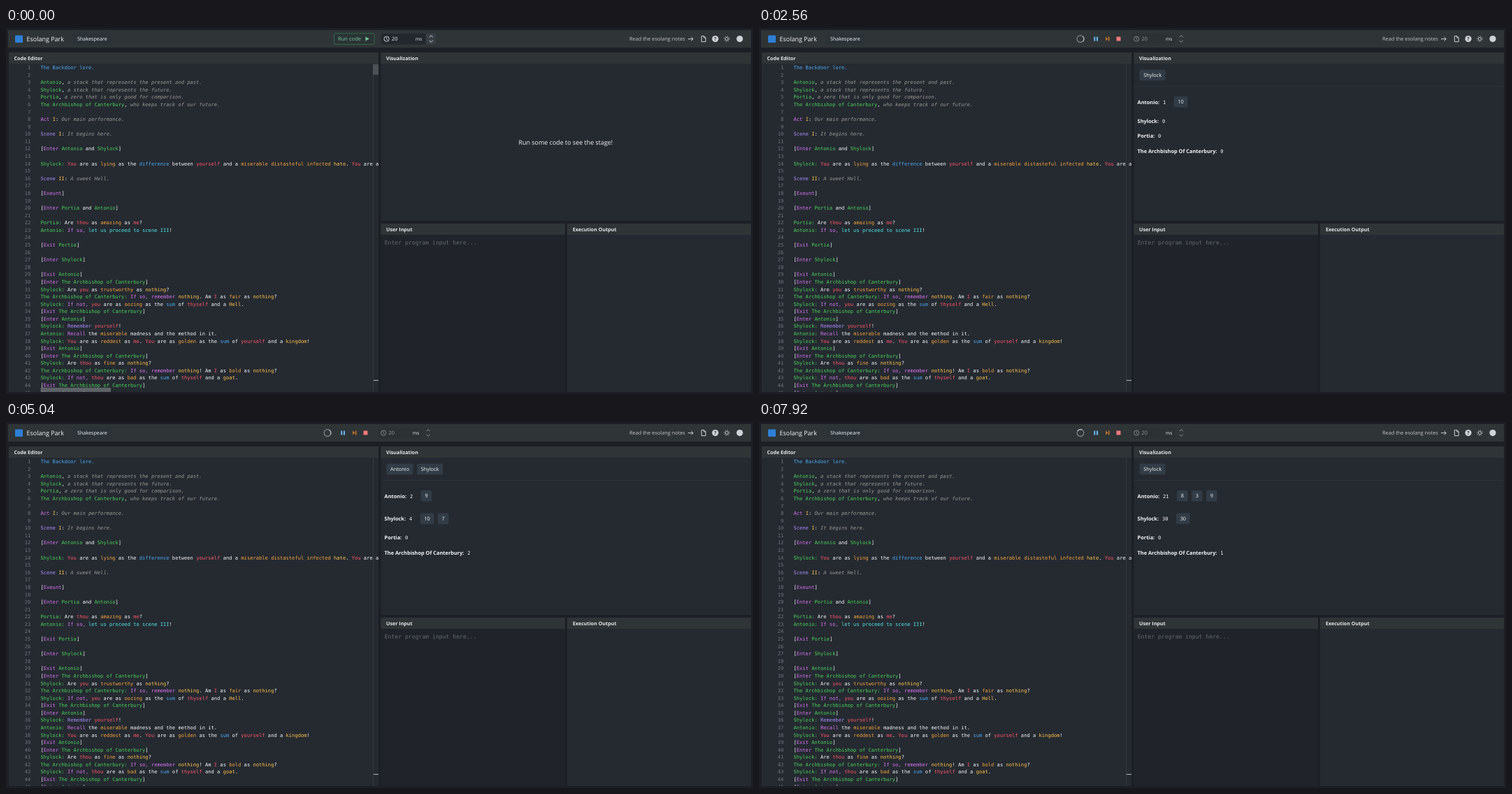
An HTML page that plays this animation: 1069x524 px, repeating every 8 s.

```html
<!DOCTYPE html>
<html lang="en">
<head>
<meta charset="utf-8">
<title>Esolang Park</title>
<style>
html, body { margin: 0; width: 100%; height: 100%; overflow: hidden; background: #1c2026; }
svg { display: block; width: 1069px; height: 524px; }
text { font: 7.35px "Open Sans", sans-serif; fill: #f3f5f7; white-space: pre; text-rendering: geometricPrecision; }
.h { font-size: 7.15px; font-weight: 700; fill: #e6e9ec; }
.lab { font-size: 7.4px; font-weight: 700; }
.m { font: 7.114px "DejaVu Sans Mono", monospace; }
.num { fill: #70767e; text-anchor: end; }
.g { fill: #49d159; } .r { fill: #ff5566; } .o { fill: #f5a33c; } .y { fill: #ffc24a; }
.b { fill: #4aa8f0; } .p { fill: #d873f2; } .v { fill: #a98bfa; } .c { fill: #52e6e6; }
.i { fill: #9a9890; font-style: italic; }
.ic { fill: none; stroke: #cfd3d8; stroke-width: 1; }
</style>
</head>
<body>
<svg id="stage" viewBox="0 0 1069 524"></svg>
<script>
const code = `The Backdoor lore.

Antonio, a stack that represents the present and past.
Shylock, a stack that represents the future.
Portia, a zero that is only good for comparison.
The Archbishop of Canterbury, who keeps track of our future.

Act I: Our main performance.

Scene I: It begins here.

[Enter Antonio and Shylock]

Shylock: You are as lying as the difference between yourself and a miserable distasteful infected hate. You are as

Scene II: A sweet Hell.

[Exeunt]

[Enter Portia and Antonio]

Portia: Are thou as amazing as me?
Antonio: If so, let us proceed to scene III!

[Exit Portia]

[Enter Shylock]

[Exit Antonio]
[Enter The Archbishop of Canterbury]
Shylock: Are you as trustworthy as nothing?
The Archbishop of Canterbury: If so, remember nothing. Am I as fair as nothing?
Shylock: If not, you are as oozing as the sum of thyself and a Hell.
[Exit The Archbishop of Canterbury]
[Enter Antonio]
Shylock: Remember yourself!
Antonio: Recall the miserable madness and the method in it.
Shylock: You are as reddest as me. You are as golden as the sum of yourself and a kingdom!
[Exit Antonio]
[Enter The Archbishop of Canterbury]
Shylock: Are thou as fine as nothing?
The Archbishop of Canterbury: If so, remember nothing! Am I as bold as nothing?
Shylock: If not, thou are as bad as the sum of thyself and a goat.
[Exit The Archbishop of Canterbury]
[Enter Antonio]`.split('\n');

const words = {
  g: '(?:The Archbishop of Canterbury|Antonio|Shylock|Portia):?',
  c: 'let us proceed to scene III',
  p: 'If so,|If not,|Enter|Exit|Exeunt|Recall|remember',
  v: 'Remember',
  r: 'You|you|thou|yourself|thyself|me|I',
  b: 'difference|sum',
  o: 'lying|miserable|distasteful|infected|amazing|trustworthy|fair|oozing|reddest|golden|fine|bold|bad',
  y: 'hate|nothing|Hell|kingdom|goat'
};
const lexer = new RegExp(Object.entries(words).map(([k, w]) => `(?<${k}>\\b(?:${w})(?!\\w))`).join('|'), 'g');

const CH = 4.283, LEFT = 49.5, PITCH = 10.58;
const span = (cls, s) => `<tspan class="${cls}">${s}</tspan>`;
const text = (x, y, s, cls = '', more = '') => `<text x="${x}" y="${y}" class="${cls}" ${more}>${s}</text>`;
const rect = (x, y, w, h, fill, more = '') => `<rect x="${x}" y="${y}" width="${w}" height="${h}" fill="${fill}" ${more}/>`;
const path = (d, more = 'class="ic"') => `<path d="${d}" ${more}/>`;
const ring = (x, y, r, more = 'class="ic"') => `<circle cx="${x}" cy="${y}" r="${r}" ${more}/>`;
const size = px => `style="font-size:${px}px"`;

function paint(s, n) {
  if (!n) return span('b', s);
  let m = s.match(/^(Act|Scene) (I+)(: )(.*)/);
  if (m) return span(m[1] == 'Act' ? 'p' : 'v', m[1]) + ' ' + span('y', m[2]) + m[3] + span('i', m[4]);
  m = s.match(/^([^:[,]+)(, )(.*)/);
  if (m) return span('g', m[1]) + m[2] + span('i', m[3]);
  return s.replace(lexer, (w, ...a) => {
    const hit = a[a.length - 1];
    return span(Object.keys(hit).find(k => hit[k]), w);
  });
}

// id such as 42.1 means line 42, second sentence
function mark(id) {
  if (!id) return '';
  const [line, nth = 0] = id.split('.').map(Number), s = code[line - 1];
  let from = 0, len = s.length;
  if (s[0] != '[') {
    const body = s.slice(s.indexOf(': ') + 2);
    const part = body.split(/(?<=[.!?]) /)[nth];
    from = s.length - body.length + body.indexOf(part);
    len = part.length;
  }
  const x = LEFT + from * CH, w = Math.min(len * CH, 533 - x);
  return rect(x, 51.3 + (line - 1) * PITCH, w, 10.4, '#4b4f1f');
}

const BAR = '#2f3436', PANEL = '#252a31', CHIP = '#323c46';
const panel = (x, y, w, h, title, tx, fill = PANEL) =>
  rect(x, y, w, h, fill) + rect(x, y, w, 16, BAR) + text(tx, y + 10.7, title, 'h');

const frame =
  rect(3, 3, 1063, 25, BAR) +
  rect(13, 10.5, 11, 10.5, '#2d7fd6', 'rx="1"') +
  text(29.5, 18.7, 'Esolang Park', '', size(8.97)) +
  rect(96, 8, 55, 15.5, '#2b3338', 'rx="1.7"') +
  text(102, 18.3, 'Shakespeare', '', size(7.2)) +
  text(892, 18.3, 'Read the esolang notes', '', 'fill-opacity=".75"') +
  path('M976 15.7H983M980.5 13L983.3 15.7L980.5 18.4') +
  path('M995.3 11.6H999L1001.2 13.8V19.6H995.3ZM998.8 11.6V14H1001.2') +
  ring(1015, 15.6, 4.6, 'fill="#cfd3d8"') +
  text(1015, 18.2, '?', '', 'style="font-size:7px;font-weight:700;fill:#2f3436;text-anchor:middle"') +
  ring(1031.5, 15.6, 2.1) + ring(1031.5, 15.6, 3.8, 'class="ic" stroke-dasharray="1.2 1.784"') +
  ring(1050, 15.6, 4.6, 'fill="#cfd3d8"') +
  panel(4, 35, 529, 486, 'Code Editor', 11.5) +
  panel(536.5, 35, 529.5, 241, 'Visualization', 544) +
  panel(536.5, 280, 263.5, 241, 'User Input', 544, '#20242a') +
  panel(803, 280, 263, 241, 'Execution Output', 811) +
  text(541.7, 310.4, 'Enter program input here...', 'm', 'style="font-size:8.12px;fill:#626971"');

const listing = code.map((s, n) => {
  const y = 59.1 + n * PITCH;
  return text(35.2, y, n + 1, 'm num') + text(LEFT, y, paint(s, n), 'm');
}).join('');

const stage = document.getElementById('stage');
stage.innerHTML = `<defs><clipPath id="ed"><rect x="4" y="51" width="529" height="470"/></clipPath></defs>
${frame}
<g clip-path="url(#ed)"><g id="hl"></g>${listing}
${rect(525, 51, .7, 470, '#3a3f46')}${rect(526, 504, 7, 1, '#b5b8bb')}
${rect(49.5, 515, 100.5, 6, '#7c8084', 'id="hbar"')}${rect(525, 52, 8, 15, '#4c5156', 'id="vbar"')}</g>
<g id="live"></g>`;
const [hl, hbar, vbar, live] = ['hl', 'hbar', 'vbar', 'live'].map(id => document.getElementById(id));

const chevrons = path('M605.8 13.1L608.3 10.8L610.8 13.1M605.8 17.9L608.3 20.2L610.8 17.9', 'transform="translate(-4 0)" class="ic"');
const clock = x => ring(x, 15.6, 3.6) + path(`M${x} 13.4V15.8L${x + 1.5} 17.2`);

function idleBar(hover) {
  return rect(469.5, 7.8, 57.5, 15.7, hover ? '#28463a' : '#2b3334', 'rx="1.7" stroke="#2f7a52" stroke-width=".8"') +
    text(475, 18.3, 'Run code', '', 'style="font-size:7.6px;fill:#72ca9b"') +
    path('M514.5 12.6L519.8 15.6L514.5 18.6Z', 'fill="#72ca9b"') +
    rect(537, 8, 63, 15.5, '#23282e', 'rx="1.7"') + clock(544.6) +
    text(552, 18.3, '20') + text(586, 18.2, 'ms', '', size(6.6)) +
    rect(602, 8, 12.8, 7.4, '#394047', 'rx="1"') + rect(602, 16, 12.8, 7.4, '#394047', 'rx="1"') +
    `<g transform="translate(4 0)">${chevrons}</g>` +
    text(733.5, 167, 'Run some code to see the stage!', '', size(8.95));
}

function runBar(angle) {
  return ring(460, 15.6, 4.9, 'fill="none" stroke="#7d848b" stroke-width="1.3"') +
    path('M460 10.7A4.9 4.9 0 0 1 464.9 15.6', `fill="none" stroke="#aeb5bc" stroke-width="1.3" transform="rotate(${angle} 460 15.6)"`) +
    rect(479.3, 12.6, 2.1, 6, '#68b5ee') + rect(483, 12.6, 2.1, 6, '#68b5ee') +
    path('M496 12.6L499.6 15.6L496 18.6ZM499.8 12.6H501.6V18.6H499.8Z', 'fill="#b8702c"') +
    rect(511.5, 12.6, 6, 6, '#ee7a7d', 'rx=".5"') +
    rect(533, 8, 63, 15.5, '#2c3134', 'rx="1.7"') +
    `<g opacity=".55">${clock(540.2)}${text(547.6, 18.3, '20')}</g>` +
    text(582, 18.2, 'ms', '', size(6.6) + ' dx="0"') +
    `<g opacity=".6">${chevrons}</g>`;
}

const cast = {
  A: { name: 'Antonio', chip: 38, x: 578 },
  S: { name: 'Shylock', chip: 37, x: 577 },
  P: { name: 'Portia', chip: 31.6, x: 571 },
  R: { name: 'The Archbishop Of Canterbury', chip: 115.8, x: 660.3 }
};

function chip(x, y, w, s, bg = CHIP, fg = '#f3f5f7') {
  return rect(x, y, w, 15.6, bg, 'rx="1.7"') +
    text(x + w / 2, y + 10.4, s, '', `style="text-anchor:middle;fill:${fg}"`);
}

function theatre([who, , A, S, R, answer]) {
  let out = rect(536.5, 83.3, 529.5, .7, '#2f353c'), x = 544.6;
  if (who != '-') for (const k of who) {
    out += chip(x, 59.7, cast[k].chip, cast[k].name);
    x += cast[k].chip + 5.6;
  }
  if (answer) {
    const yes = answer == 'yes';
    out += text(x + 14.2, 70.1, 'Answer to question:') +
      chip(x + 90.6, 59.7, yes ? 23.5 : 20.6, answer, yes ? '#1d5c3d' : '#77232a', yes ? '#8fe0b3' : '#ff9a9d');
  }
  let top = 89.5;
  const values = { A, S, P: '0', R };
  for (const k in cast) {
    const [val, list] = values[k].split(':'), h = list ? 32.6 : 21.6, mid = top + h / 2;
    out += text(541.6, mid + 2.7, cast[k].name + ':', 'lab') + text(cast[k].x, mid + 2.7, val, 'm');
    let cx = cast[k].x + val.length * CH + 11.5;
    if (list) for (const n of list.split(',')) {
      const w = 11.2 + 4.2 * n.length;
      out += chip(cx, mid - 7.8, w, n);
      cx += w + 5.6;
    }
    top += h;
  }
  return out;
}

// on stage, marked sentence, Antonio, Shylock, Archbishop, answer
const acts = [
  [1680, `- - 0 0 0;AS 14 0 0 0;PA 22 10 0 0;S 30 10 0 0;SR 32.1 10 0:0 0 yes;AS 36 10:10 0:0 0;AS 38.1 1:10 0 0;SR 43 1:10 0 0 yes`],
  [2560, `S - 1:10 0 0;SR - 3:10,1 0 0 yes;AS - 3:10,1 0 0;SR - 7:10,1,3 0 0;AS - 7:10,1,3 0 0;SR - 10:10,1,3,7 0 0;SR - 10:10,1,3,7 0 1 yes;AS - 7:10,1,3 10 1`],
  [3400, `AS - 7:10,1,3 10:10 2;S - 3:10,1 7:10 2;AS - 3:10,1 7:10,7 3;AS - 1:10 3:10,7,3 3;AS - 10 1:10,7,3,1 4;AS 27 9 1:10,7,3,1 4;S 29 9 1:10,7,3,1 4;SR 31 9 1:10,7,3,1 4 no;SR 33 9 1:10,7,3,1 4 no`],
  [4320, `S 34 9 1:10,7,3,1 3;AS 36 9:9 1:10,7,3,1 3;AS 38 1:9 1:10,7,3 3;SR 41 2:9 1:10,7,3 3 no;S 44 2:9 1:10,7,3 2;SR - 2:9 1:10,7,3 2;AS - 2:9 3:10,7 2;AS - 2:9 4:10,7 2`],
  [5160, `S - 2:9 10:10 2;SR - 2:9 20 2;AS - 2:9 20:20 2;S - 2:9 14:20 2;SR - 2:9 14:20,14 2;AS - 2:9 6:20,14 2;SR - 2:9 6:20,14,6 3;S - 2:9 6:20,14,6 3`],
  [6000, `AS - 2:9 2:20,14,6,2 4;AS 27 8 2:20,14,6,2 4;S 29 8 2:20,14,6,2 4;SR 31 8 2:20,14,6,2 4 no;SR 33 8 2:20,14,6,2 3 no;AS 35 8 2:20,14,6,2 3;AS 36 8:8 2:20,14,6,2 3;AS 38.1 3:8 2:20,14,6 3;SR 40 3:8 2:20,14,6 3`],
  [6880, `SR 42.1 3:8 2:20,14,6 3;SR - 3:8 2:20,14,6 2 no;AS - 3:8,3 6:20,14 2;S - 9:8,3 6:20,14 2;AS - 9:8,3,9 14:20 2;S - 9:8,3,9 14:20 2;AS - 21:8,3,9 20 2;AS - 21:8,3,9 30 2`],
  [7720, `AS - 21:8,3,9 30 2;AS - 21:8,3,9 30:30 1;S - 21:8,3,9 30:30 1`]
];
const LOOP = 8000;
const steps = acts.flatMap(([start, rows], n) => {
  const list = rows.split(';'), end = n + 1 < acts.length ? acts[n + 1][0] : LOOP;
  return list.map((row, i) => ({
    at: Math.round((start + (end - start) * i / list.length) / 40) * 40,
    state: row.split(' ')
  }));
});

const fadeH = [[0, 1], [120, .75], [200, .5], [320, .3], [520, .1], [720, 0]];
const fadeV = [[0, 1], [520, .6], [720, .3], [840, 0]];
const held = (table, t) => table.filter(k => k[0] <= t).pop()[1];

let shown;
function draw() {
  const t = performance.now() % LOOP;
  hbar.setAttribute('opacity', held(fadeH, t) * .65);
  vbar.setAttribute('opacity', held(fadeV, t));
  const step = steps.filter(s => s.at <= t).pop();
  const key = step ? step.at : t >= 1000 ? 'hover' : 'idle';
  if (key !== shown) {
    shown = key;
    const id = step && step.state[1];
    hl.innerHTML = id && id != '-' ? mark(id) : '';
    live.innerHTML = step ? runBar(step.at % 500 * .72) + theatre(step.state) : idleBar(key == 'hover');
  }
  requestAnimationFrame(draw);
}
draw();
</script>
</body>
</html>
```
